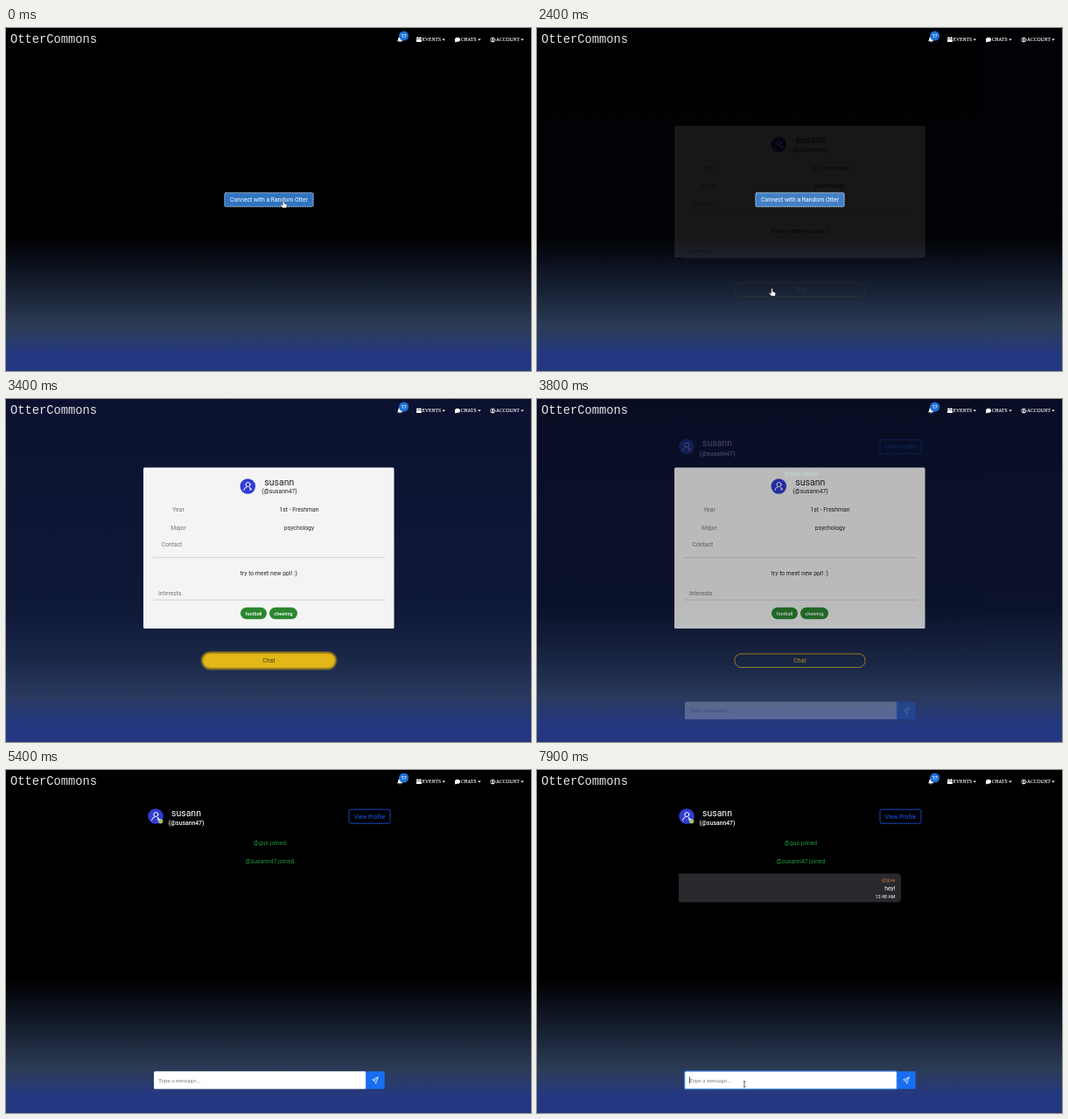
Recreate the animation shown at these times as an HTML page. Size 600 by 393 pixels, loop 8000 ms.

```html
<!DOCTYPE html>
<html lang="en">
<head>
<meta charset="utf-8">
<title>Random chat</title>
<style>
  html, body { margin: 0; width: 100%; height: 100%; overflow: hidden; background: #000; }
  svg { position: absolute; left: 0; top: 0; width: 600px; height: 393px; }
  text { font: 6.82px Roboto, Arial, sans-serif; fill: #fff; white-space: pre; }
  .mid { text-anchor: middle; }
  .end { text-anchor: end; }
  .serif { font-family: "Liberation Serif", "Times New Roman", serif; }
  .nav text { font-size: 5.6px; stroke: #fff; stroke-width: .12; }
  .nav .logo { font: 13.75px "Courier New", "Liberation Mono", monospace; fill: #e4e4e4; stroke: none; }
  .name { font-size: 10.5px; }
  .handle { font-weight: 500; }
  .small { font-size: 5.97px; }
  .card text { fill: #24262b; }
  .card .label { fill: #74777c; }
  .card .pill { font-size: 5.5px; font-weight: 500; fill: #fff; }
  .outline { fill: none; stroke: #1547c4; }
  .blue { fill: #1d5af2; }
  .green { fill: #1d963d; }
  .line { fill: none; stroke: #fff; stroke-linecap: round; stroke-linejoin: round; }
  .rings { position: absolute; perspective: 341px; }
  .rings i { position: absolute; inset: 0; box-sizing: border-box; border: 6.4px solid #fff; border-radius: 50%; opacity: .4; }
  #bigRings { left: 269px; top: 138.5px; width: 64px; height: 64px; }
  #smallRings { left: 30px; top: 330.5px; width: 43px; height: 43px; }
  #smallRings i { border-width: 4.3px; opacity: .22; }
</style>
</head>
<body>
<svg viewBox="0 0 600 393">
  <defs>
    <linearGradient id="night" x2="0" y2="1">
      <stop offset=".61"/>
      <stop offset=".67" stop-color="#080c15"/>
      <stop offset=".78" stop-color="#1a2538"/>
      <stop offset=".87" stop-color="#2c3c56"/>
      <stop offset=".915" stop-color="#293b6c"/>
      <stop offset=".95" stop-color="#243882"/>
    </linearGradient>
    <linearGradient id="navy" x2="0" y2="1">
      <stop stop-color="#0b1230"/>
      <stop offset=".6" stop-color="#0e1837"/>
      <stop offset=".76" stop-color="#1a2748"/>
      <stop offset=".87" stop-color="#293a60"/>
      <stop offset=".95" stop-color="#243882"/>
    </linearGradient>
    <filter id="blur" x="-10%" y="-60%" width="120%" height="220%"><feGaussianBlur stdDeviation="1.2"/></filter>
    <g id="avatar">
      <circle r="8.8" fill="#2f3dd2"/>
      <circle class="line" cx=".3" cy="-2" r="2.5"/>
      <path class="line" d="M-4.5 4.5Q-3.8 1-1 .5M2 1l2 2.5"/>
      <circle class="line" cx="3.2" cy="3.4" r="1" stroke-width=".8"/>
    </g>
    <path id="caretDown" d="M-1.8-.9h3.6L0 .9z" fill="#fff"/>
  </defs>

  <rect width="600" height="393" fill="url(#night)"/>

  <g id="home">
    <rect x="249.8" y="188.8" width="101.4" height="16" rx="1.5" fill="#2f74c0" stroke="#d4e2f2" stroke-dasharray="1.2 .8"/>
    <text class="mid" x="300.5" y="199">Connect with a Random Otter</text>
  </g>

  <g id="waiting">
    <text class="mid small" x="300.3" y="218.5" style="fill:#66686c">browse other pages while you wait ...</text>
    <text class="mid" x="300.5" y="228.8">There are 52 differences between the left side and right side of Tovel Hall</text>
    <rect class="outline" x="274.5" y="239" width="52" height="16" rx="2"/>
    <text class="mid blue" x="300.5" y="249.3">Connecting ...</text>
  </g>

  <g id="chat">
    <use href="#avatar" x="171" y="53"/>
    <circle id="online" cx="176.7" cy="58.8" r="2.3" fill="#9ccb3b" stroke="#dfe8d0" stroke-width=".6"/>
    <text class="mid name" x="206" y="52.7">susann</text>
    <text class="mid handle" x="206" y="63">(@susann47)</text>
    <rect class="outline" x="392" y="45.2" width="47" height="16" rx="2"/>
    <text class="mid blue" x="415.5" y="55.5">View Profile</text>
    <text class="mid green" x="301.5" y="86">@gus joined</text>
    <text id="joined" class="mid green" x="301.5" y="107">@susann47 joined</text>
    <g id="bubble">
      <path d="M162 118.5h249q5 0 5 5v23q0 5-5 5H162z" fill="#29292d"/>
      <text class="end serif" x="409.5" y="128.3" style="fill:#cc8446">@gus</text>
      <text class="end" x="409.5" y="138">hey!</text>
      <text class="end" x="409.5" y="147.3" style="font-size:5.4px">12:48 AM</text>
    </g>
    <rect x="169" y="345.2" width="242.5" height="20.3" rx="1.5" fill="#fff"/>
    <path d="M411.2 345.2h20q1.5 0 1.5 1.5v17.3q0 1.5-1.5 1.5h-20z" fill="#176ef0"/>
    <path class="line" stroke-width=".7" d="M425 352l-6.3 3 2.5 1.2 1.3 2.8zl-3.8 4.2"/>
    <rect id="focus" x="168.7" y="345" width="242.6" height="20.7" rx="1.5" fill="none" stroke="#3f86f5" stroke-width="1.2"/>
    <text id="hint" class="serif" x="174" y="357.7" style="fill:#6f757c">Type a message...</text>
    <text id="typed" class="serif" x="174" y="357.7" style="fill:#222"></text>
    <rect id="caret" y="351.5" width=".7" height="7.5" fill="#111"/>
  </g>

  <g id="profile">
    <rect width="600" height="393" fill="url(#navy)"/>
    <rect id="panel" x="157" width="286.5" rx="1.5" fill="#f4f4f5"/>
    <g id="details" class="card">
      <use href="#avatar" x="276.3" y="100"/>
      <text class="mid name" x="312.3" y="98.5">susann</text>
      <text class="mid" x="312.5" y="108">(@susann47)</text>
      <text class="mid label" x="197" y="129">Year</text>
      <text class="mid" x="335" y="129">1st - Freshman</text>
      <text class="mid label" x="197" y="149.5">Major</text>
      <text class="mid" x="335" y="149.5">psychology</text>
      <text class="label" x="177.5" y="169.3">Contact</text>
      <text class="mid" x="300.3" y="201.5">try to meet new ppl! :)</text>
      <text class="label" x="174" y="224.7">Interests</text>
      <path d="M168 181.7h265.5M168 230.2h265.5" stroke="#c9cacc" stroke-width=".8"/>
      <g id="interests">
        <rect x="268" y="238.7" width="30" height="13.6" rx="6.8" fill="#2b872f"/>
        <rect x="301" y="238.7" width="32" height="13.6" rx="6.8" fill="#2b872f"/>
        <text class="mid pill" x="283" y="247.5">football</text>
        <text class="mid pill" x="317" y="247.5">cheering</text>
      </g>
    </g>
    <rect id="plain" x="226" y="292" width="149" height="15.5" rx="7" fill="none" stroke="#e0b41c" stroke-width=".8"/>
    <g id="hover">
      <rect x="223.5" y="290" width="154" height="19.5" rx="9.7" fill="#d6a918" filter="url(#blur)"/>
      <rect x="225" y="291.5" width="151" height="16.5" rx="8" fill="#e2b716" stroke="#a9841a" stroke-width=".8"/>
    </g>
    <text id="chatLabel" class="mid" x="300.3" y="302.2">Chat</text>
  </g>

  <g class="nav" fill="#fff">
    <text class="logo" x="5" y="16.7">OtterCommons</text>
    <path d="M447 15.2q1.2-1 1.2-3 .2-2 2-2.2 1.8.2 2 2.2 0 2 1.2 3zM449.2 15.8h2q-1 1.6-2 0z"/>
    <circle cx="454.6" cy="9" r="5.5" fill="#1f70d8"/>
    <text class="mid" x="454.6" y="11">17</text>
    <path d="M469 11h5.8v1.2H469zM469 12.8h5.8V16H469zM470 10h.9v1h-.9zM473 10h.9v1h-.9z"/>
    <text class="serif" x="475.6" y="15.4">EVENTS</text>
    <use href="#caretDown" x="500.2" y="13.5"/>
    <ellipse cx="516" cy="13.3" rx="3" ry="2.5"/><path d="M513.5 14l-.6 2.4 2.8-1z"/>
    <text class="serif" x="519.8" y="15.4">CHATS</text>
    <use href="#caretDown" x="541" y="13.5"/>
    <circle class="line" cx="556.3" cy="13.4" r="2.6" stroke-width=".7"/>
    <circle cx="556.3" cy="12.7" r="1.1"/><path d="M554.4 15.2q1.9-2 3.8 0-1.9 1.4-3.8 0z"/>
    <text class="serif" x="560" y="15.4">ACCOUNT</text>
    <use href="#caretDown" x="590" y="13.5"/>
  </g>

  <path id="hand" d="M-.8 0q.9-.7 1.6 0V3.2l2.7.9q.7.3.6 1.1L3.6 8.3H-.7L-3.2 5.2q.2-1 1.1-.6l1.3.9z" fill="#fff" stroke="#222" stroke-width=".4"/>
  <path id="arrow" d="M0 0v8l1.9-1.7L3.2 9l1.2-.6L3.2 5.9h2.5z" fill="#fff" stroke="#222" stroke-width=".4"/>
  <path id="beam" d="M-1.3-3.2h2.6M0-3.2v6.4M-1.3 3.2h2.6" fill="none" stroke="#222" stroke-width=".7"/>
</svg>
<div class="rings" id="bigRings"><i></i><i></i></div>
<div class="rings" id="smallRings"><i></i><i></i></div>

<script>
const LOOP = 8000, CLICK = 100, MATCH = 2000, LOADED = 2800, OPEN_CHAT = 3700, JOIN = 4900,
      FOCUS = 6350, TYPE = 6500, SEND = 7450;
const $ = id => document.getElementById(id);
const ramp = (t, a, b) => Math.min(1, Math.max(0, (t - a) / (b - a)));
const ease = x => x * x * (3 - 2 * x);
const show = (id, on) => $(id).style.display = on ? '' : 'none';
const place = (id, x, y) => $(id).setAttribute('transform', `translate(${x} ${y})`);

function spin(id, turn) {
  const pose = (x, y) => `rotateX(${x * turn}deg) rotateY(${y * turn}deg) rotateZ(${360 * turn}deg)`;
  const [right, left] = $(id).children;
  right.style.transform = pose(180, 360);
  left.style.transform = pose(360, 180);
}

// The card is shorter until its interests arrive; its bottom edge stays put.
function drawProfile(t) {
  const loaded = t >= LOADED, chatting = t >= OPEN_CHAT, hovered = loaded && !chatting;
  const drop = loaded ? 0 : 33.5;
  $('profile').style.opacity = chatting ? 1 - ramp(t, OPEN_CHAT, 4130) : ramp(t, 2340, 3000);
  $('panel').setAttribute('y', 78.5 + drop);
  $('panel').setAttribute('height', 184.5 - drop);
  place('details', 0, drop);
  show('interests', loaded);
  show('plain', !hovered);
  show('hover', hovered);
  $('chatLabel').style.fill = hovered ? '#4b4023' : '#e0b41c';
}

function drawInput(t) {
  const focused = t >= FOCUS;
  const count = t < TYPE || t >= SEND ? 0 : Math.min(4, 1 + Math.floor((t - TYPE) / 150));
  $('typed').textContent = 'hey!'.slice(0, count);
  show('hint', !count);
  show('focus', focused);
  const blink = t >= SEND ? t - SEND : t >= TYPE ? 0 : t - FOCUS;
  show('caret', focused && blink % 1000 < 500);
  $('caret').setAttribute('x', 174 + (count ? $('typed').getComputedTextLength() + .3 : 0));
}

function drawPointer(t) {
  const move = ease(ramp(t, MATCH, 2350));
  show('hand', t < CLICK || (t >= MATCH && t < 2900));
  place('hand', 317 - 48.5 * move, 197.8 + 101 * move);

  const y = 393 - 33 * ease(ramp(t, 5900, 6300));
  const inside = y < 365;
  show('arrow', t >= 5900 && !inside);
  show('beam', inside);
  place('arrow', 237, y);
  place('beam', 237, y);
}

function draw(t) {
  const waiting = t >= CLICK && t < MATCH, chatting = t >= OPEN_CHAT, joined = t >= JOIN;
  show('home', !waiting && !chatting);
  show('waiting', waiting);
  for (const id of ['bigRings', 'smallRings']) {
    show(id, waiting);
    spin(id, (t - 35) / 2000);
  }
  drawProfile(t);
  show('chat', chatting);
  place('chat', 0, joined ? 0 : 1.5);
  show('online', joined);
  show('joined', joined);
  show('bubble', t >= SEND);
  drawInput(t);
  drawPointer(t);
}

const start = performance.now();
function tick() {
  draw((performance.now() - start) % LOOP);
  requestAnimationFrame(tick);
}
tick();
</script>
</body>
</html>
```
